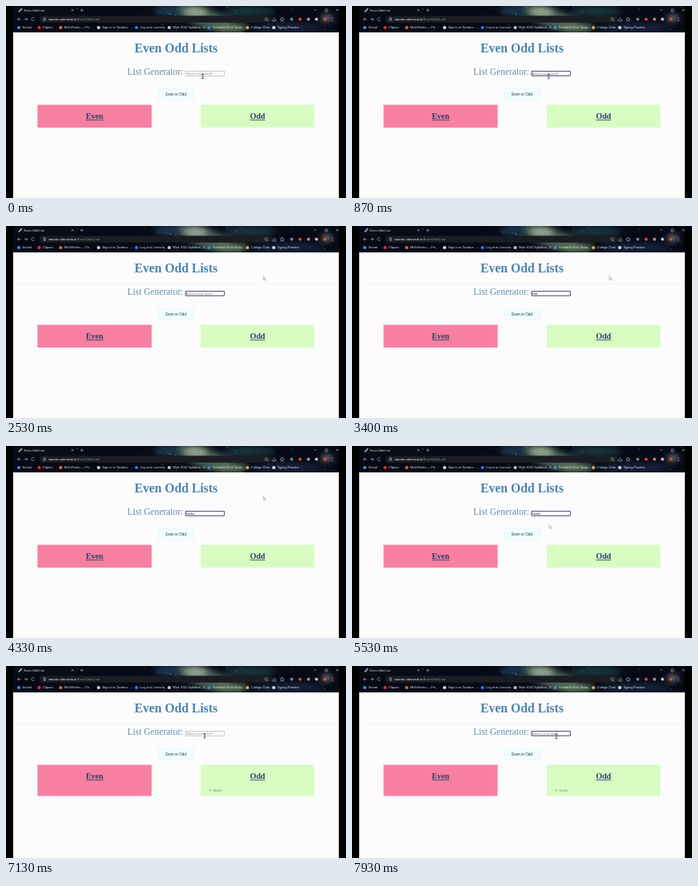
An HTML page that plays this animation: 426x240 px, repeating every 8000 ms.

```html
<!DOCTYPE html>
<html lang="en">
<head>
<meta charset="utf-8">
<title>Even Odd Lists</title>
<style>
  html, body { margin: 0; width: 100%; height: 100%; overflow: hidden; background: #000; }
  svg { display: block; width: 100vw; height: 100vh; }
  text { font-family: "Liberation Sans", Arial, sans-serif; }
  .serif { font-family: "Liberation Serif", Times, serif; }
  .mid { text-anchor: middle; }
  .heading { font-weight: bold; font-size: 10.1px; fill: #2b4060; }
  .chrome { font-size: 4px; fill: #e4e6ea; }
  .icon { fill: none; stroke: #a3a7af; stroke-width: .7; }

  .pointer, .arrow, .beam, .focus, .placeholder, .typed, .reveal, .caret, .item, .panel, .press {
    animation: 8s infinite step-end;
  }
  .pointer { animation-name: move; animation-timing-function: ease-in-out; }
  .arrow { animation-name: arrow; }
  .beam { animation-name: beam; }
  .focus { animation-name: focus; }
  .placeholder { animation-name: placeholder; }
  .typed { animation-name: typed; }
  .reveal { animation-name: reveal; transform-origin: 226px 0; }
  .caret { animation-name: caret; }
  .item { animation-name: item; }
  .panel { animation-name: panel; transform-origin: 0 123.5px; }
  .press { animation-name: press; }

  @keyframes move {
    0%, 11.25% { transform: translate(246.5px, 88px); }
    20%, 60% { transform: translate(322px, 62.3px); }
    68%, 69.2% { transform: translate(246.8px, 98px); }
    74%, 80% { transform: translate(214px, 110px); }
    87%, 90% { transform: translate(248.8px, 87.3px); }
    96%, 100% { transform: translate(256px, 88px); }
  }
  @keyframes arrow { 0% { opacity: 0; } 13.3% { opacity: 1; } 85.8%, 100% { opacity: 0; } }
  @keyframes beam { 0% { opacity: 1; } 13.3% { opacity: 0; } 85.8%, 100% { opacity: 1; } }
  @keyframes focus { 0% { opacity: 0; } 8.3% { opacity: 1; } 77.5% { opacity: 0; } 94.1%, 100% { opacity: 1; } }
  @keyframes placeholder { 0% { opacity: 1; } 38% { opacity: 0; } 77.5%, 100% { opacity: 1; } }
  @keyframes typed { 0% { opacity: 0; } 38% { opacity: 1; } 77.5%, 100% { opacity: 0; } }
  @keyframes reveal {
    0% { transform: scaleX(.33); } 41% { transform: scaleX(.56); }
    44.1% { transform: scaleX(.66); } 46.6% { transform: scaleX(.76); }
    49.1%, 100% { transform: scaleX(1); }
  }
  @keyframes caret {
    0% { transform: none; } 38% { transform: translateX(3px); }
    41% { transform: translateX(5.3px); } 44.1% { transform: translateX(6.2px); }
    46.6% { transform: translateX(7.1px); } 49.1% { transform: translateX(9.4px); }
    77.5%, 100% { transform: none; }
  }
  @keyframes item { 0% { opacity: 0; } 77.5%, 100% { opacity: 1; } }
  @keyframes panel { 0% { transform: none; } 77.5%, 100% { transform: scaleY(1.368); } }
  @keyframes press { 0% { fill: #f0fdfe; } 76.5% { fill: #e2f3f5; } 77.5%, 100% { fill: #f0fdfe; } }
</style>
</head>
<body>
<svg viewBox="0 0 426 240" preserveAspectRatio="none">
  <defs>
    <filter id="soft" x="-50%" y="-80%" width="200%" height="260%"><feGaussianBlur stdDeviation="3.5"/></filter>
    <clipPath id="bar"><rect x="9" width="408" height="33"/></clipPath>
    <clipPath id="letters"><rect class="reveal" x="226" y="81" width="9.6" height="7"/></clipPath>
  </defs>
  <rect width="426" height="240"/>

  <g clip-path="url(#bar)">
    <rect x="9" width="408" height="33" fill="#070a16"/>
    <g filter="url(#soft)">
      <ellipse cx="215" cy="6" rx="30" ry="8" fill="#17324a"/>
      <ellipse cx="252" cy="16" rx="38" ry="12" fill="#466052" transform="rotate(20 252 16)"/>
      <ellipse cx="238" cy="7" rx="14" ry="6" fill="#93a691"/>
      <ellipse cx="282" cy="27" rx="20" ry="6" fill="#5a7358"/>
      <ellipse cx="305" cy="7" rx="32" ry="7" fill="#15323a"/>
      <ellipse cx="355" cy="27" rx="45" ry="6" fill="#12203a"/>
      <ellipse cx="402" cy="15" rx="7" ry="4" fill="#77777a"/>
    </g>
    <g id="stars"></g>
    <path d="M11 11V3q0-2 2-2h73q2 0 2 2v8z" fill="#090c15"/>
    <rect x="42" y="12.3" width="291" height="8.4" rx="4.2" fill="#1b1d22"/>
  </g>

  <path d="M16 7.5 20 3" stroke="#a3abcf" stroke-width="1.8"/>
  <text class="chrome" x="22.5" y="7">Even-Odd List</text>
  <path class="icon" d="m82 4 2.4 2.4m0-2.4L82 6.4M93 5.3h4m-2-2v4M386 5h3M400 4h3v3h-3zM414 4l2.4 2.4m0-2.4L414 6.4
    M18.5 16.5h-4m2-2-2 2 2 2M23 16.5h4m-2-2 2 2-2 2M35.5 15a2 2 0 1 0 .4 2M47 15.8h2.6v2.4H47zM47.5 15.8v-1h1.6v1
    M327 17.7l1.5 1.5M334 16v3h4v-3M336 17.5V14"/>
  <circle class="icon" cx="326" cy="16.5" r="1.6"/>
  <path class="icon" d="m346 14 .8 1.7 1.8.2-1.3 1.3.3 1.8-1.6-.9-1.6.9.3-1.8-1.3-1.3 1.8-.2z"/>
  <text x="53.5" y="18.2" font-size="4.35" fill="#f2f3f5">tavorin.sitenook.io<tspan fill="#8d929b">/EvenOdd-List/</tspan></text>
  <g id="extensions"></g>
  <g id="bookmarks"></g>

  <rect x="9" y="33" width="408" height="207" fill="#fcfcfd"/>
  <text class="serif mid" x="213" y="58" font-size="15.75" font-weight="bold" fill="#4a83b1">Even Odd Lists</text>
  <path d="M9 72.5h408" stroke="#f4f4ee"/>
  <text class="serif" x="152" y="86" font-size="11.5" fill="#6190a8">List Generator:</text>

  <rect x="225" y="81.5" width="48.5" height="5.7" fill="#fff" stroke="#a5a5a5" stroke-width=".6"/>
  <text class="placeholder" x="226.3" y="85.8" font-size="4" fill="#8a8a8a">What's your word?</text>
  <g class="focus">
    <rect x="225" y="81.5" width="48.5" height="5.6" rx=".4" fill="none" stroke="#37305c" stroke-width=".8"/>
    <path class="caret" d="M226.2 82.4v4" stroke="#333" stroke-width=".4"/>
  </g>
  <g clip-path="url(#letters)">
    <text class="typed" x="226.2" y="85.8" font-size="4.1" fill="#222">Hello</text>
  </g>

  <rect class="press" x="190.3" y="103.3" width="45.4" height="14.4" stroke="#e3f3f5" stroke-width=".6"/>
  <text class="mid" x="213" y="112.1" font-size="4.63" fill="#27343a">Even or Odd</text>

  <rect class="panel" x="39.5" y="123.5" width="143" height="28.5" fill="#f77fa2"/>
  <rect class="panel" x="244" y="123.5" width="142.3" height="28.5" fill="#d7fdc3"/>
  <text class="serif mid heading" x="111" y="141">Even</text>
  <text class="serif mid heading" x="315.2" y="141">Odd</text>
  <path d="M100 142.5h22M305.6 142.5h19.2" stroke="#2b4060" stroke-width=".8"/>
  <g class="item" fill="#66806c">
    <circle cx="255.8" cy="155.4" r=".8"/>
    <text class="serif" x="260" y="157" font-size="4.9">Hello</text>
  </g>

  <g class="pointer">
    <path class="arrow" d="M.3.3v4.6l1.1-1 .9 1.8.8-.4-.8-1.7h1.4z" fill="#fff" stroke="#888" stroke-width=".5"/>
    <path class="beam" d="M-1.3-2.7H1.3M0-2.7V2.7M-1.3 2.7H1.3" fill="none" stroke="#222" stroke-width=".8"/>
  </g>
</svg>
<script>
  const add = (parent, tag, attrs, label = "") => {
    const node = document.createElementNS("http://www.w3.org/2000/svg", tag);
    for (const key in attrs) node.setAttribute(key, attrs[key]);
    node.textContent = label;
    document.getElementById(parent).append(node);
  };

  let seed = 17;
  const random = () => (seed = seed * 16807 % 2147483647) / 2147483647;
  for (let i = 0; i < 170; i++) {
    const x = i < 105 ? 190 + random() * 115 : 10 + random() * 406;
    add("stars", "circle", {
      cx: x, cy: random() * 33, r: .2 + random() * .4,
      fill: i % 4 ? "#b4c4ba" : "#c8ca90", opacity: .2 + random() * .6
    });
  }

  [[358, "#777c86"], [368.5, "#d64040"], [379, "#b9829b"], [389, "#b9bcc3"], [399.5, "#d44b3d"]]
    .forEach(([cx, fill]) => add("extensions", "circle", { cx, cy: 16.5, r: 2, fill }));
  [14.5, 16.5, 18.5].forEach(cy => add("extensions", "circle", { cx: 409, cy, r: .5, fill: "#b9bcc3" }));

  const bookmarks = [
    [16, "#5681df", "Sorvel"],
    [41.5, "#e52e2e", "Clipora"],
    [68.5, "#df693c", "MoleFinder — Pri..."],
    [116, "#d5d8dc", "Sign in to Tarnbox · ..."],
    [163.5, "#3d73e0", "Log in to Lernova"],
    [204.5, "#bcc3ca", "Web 3052 Syllabus - S..."],
    [254.5, "#4b83c6", "Schedule Free Tutor..."],
    [302.5, "#d6aa57", "College Chat"],
    [335.5, "#d8dce0", "Typing Practice"]
  ];
  for (const [cx, fill, label] of bookmarks) {
    add("bookmarks", "circle", { cx, cy: 27, r: 2.1, fill });
    add("bookmarks", "text", { x: cx + 4.5, y: 28.4, class: "chrome" }, label);
  }
</script>
</body>
</html>
```
